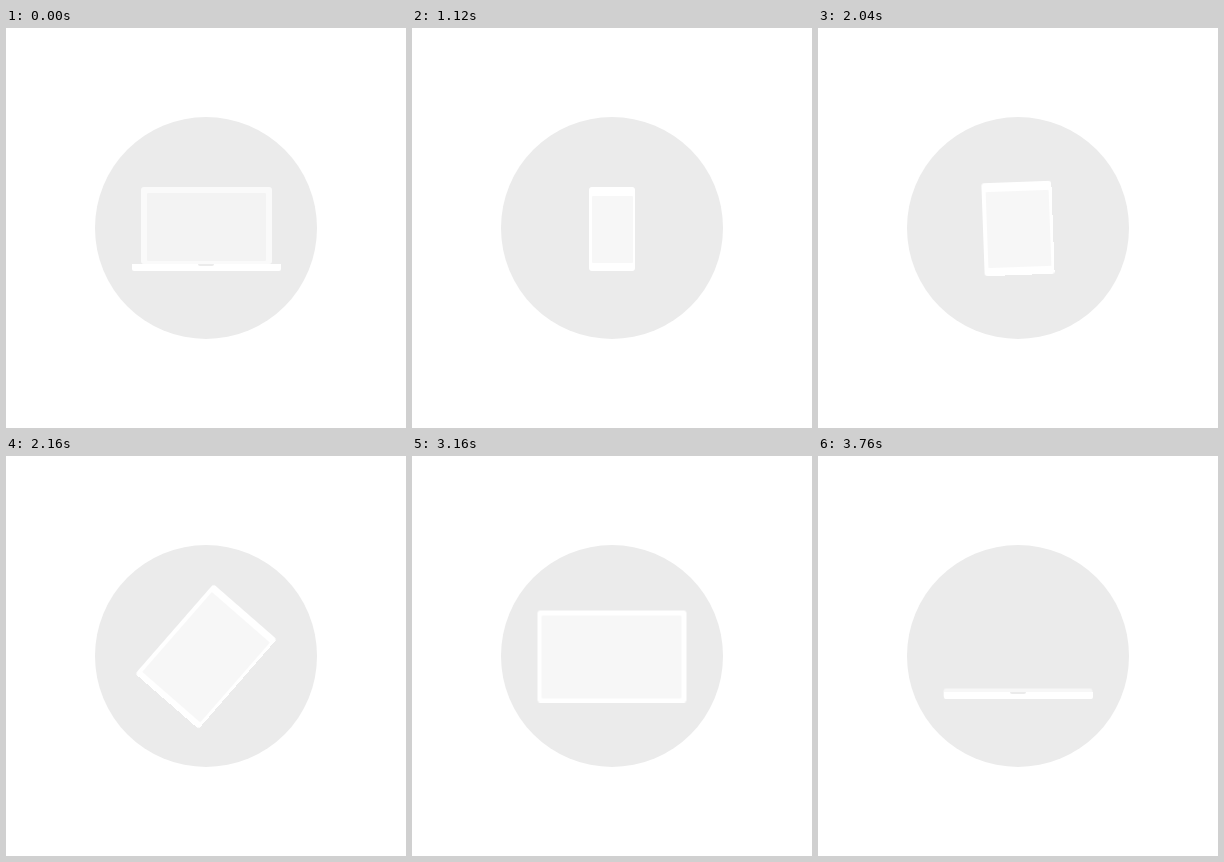
Write an HTML page that moves like this. It is 400x400 px and loops after 4960 ms.

```html
<!DOCTYPE html>
<html lang="en">
<head>
<meta charset="utf-8">
<title>Devices</title>
<style>
html, body {
  margin: 0;
  width: 100%;
  height: 100%;
  overflow: hidden;
  background: #fff;
}

.stage {
  position: relative;
  width: 400px;
  height: 400px;
  overflow: hidden;
}

.stage div {
  position: absolute;
  animation: 4960ms linear infinite;
}

.stage .disc {
  inset: 89px;
  border-radius: 50%;
  background: #ebebeb;
}

.stage .device {
  inset: 0;
  transform-origin: 200px 200.5px;
  animation-name: turn;
}

/* Edge offsets: 0 laptop, 1 phone, 2 tablet, 3 closed */
.stage .frame {
  --l0: 135px; --l1: 177px; --l2: 154px; --l3: 231.5px;
  --r0: 134.5px; --r1: 177px; --r2: 154px; --r3: 158.5px;
  --t0: 158.5px; --t1: 158.5px; --t2: 126px;
  --b0: 164px; --b1: 157.5px; --b2: 125px;
  --c0: #fafafa; --c1: #fff; --c3: #f7f7f7;
  --grow: cubic-bezier(.33, 0, .18, 1);
  border-radius: 3px;
  animation-name: left, right, ends, tint;
}

.stage .screen {
  --l0: 140.5px; --l1: 180px; --l2: 158.5px; --l3: 238px;
  --r0: 140px; --r1: 179.5px; --r2: 158px; --r3: 160.5px;
  --t0: 164.5px; --t1: 167.5px; --t2: 130.5px;
  --b0: 167.5px; --b1: 165.5px; --b2: 129.5px;
  --c0: #f3f3f3; --c1: #f7f7f7; --c3: #f7f7f7;
  --grow: cubic-bezier(.4, 0, .35, 1);
  border-radius: 1px;
  animation-name: left, right, ends, tint;
}

.stage .base {
  --l0: 125.5px; --l1: 177px; --l2: 125.5px; --l3: 125.5px;
  --r0: 125.5px; --r1: 177px; --r2: 125.5px; --r3: 125.5px;
  --grow: linear;
  top: 236px;
  height: 6.5px;
  border-radius: 0 0 2px 2px;
  background: #fff;
  animation-name: left, right, base;
}

.stage .notch {
  left: calc(50% - 8px);
  top: 0;
  width: 16px;
  height: 2px;
  border-radius: 0 0 2px 2px;
  background: #ebebeb;
  animation-name: notch;
}

/* The right edge pulls in first, the left edge follows */
@keyframes right {
  0%, 2.82% { right: var(--r0); animation-timing-function: ease-in-out; }
  6.45% { right: calc(var(--r0) - 3px); animation-timing-function: cubic-bezier(.45, 0, .55, 1); }
  16.13%, 37.9% { right: var(--r1); animation-timing-function: var(--grow); }
  48.39%, 63.31% { right: var(--r2); animation-timing-function: cubic-bezier(.4, 0, .4, 1); }
  74.19%, 100% { right: var(--r3); }
}

@keyframes left {
  0%, 11.29% { left: var(--l0); animation-timing-function: ease-in-out; }
  15.32% { left: calc(var(--l0) - 8px); animation-timing-function: cubic-bezier(.45, 0, .4, 1); }
  22.58%, 37.9% { left: var(--l1); animation-timing-function: var(--grow); }
  48.39%, 63.31% { left: var(--l2); animation-timing-function: cubic-bezier(.4, 0, .4, 1); }
  74.19%, 100% { left: var(--l3); }
}

@keyframes ends {
  0%, 9.68% { top: var(--t0); bottom: var(--b0); animation-timing-function: ease-in-out; }
  22.58%, 37.9% { top: var(--t1); bottom: var(--b1); animation-timing-function: cubic-bezier(.62, 0, .45, 1); }
  48.39%, 100% { top: var(--t2); bottom: var(--b2); }
}

@keyframes tint {
  0%, 2.82% { background: var(--c0); }
  22.58%, 71.77% { background: var(--c1); }
  74.19%, 100% { background: var(--c3); }
}

@keyframes turn {
  0%, 33.47% { transform: rotate(0deg); animation-timing-function: ease-in-out; }
  37.9% { transform: rotate(-15deg); animation-timing-function: cubic-bezier(.62, 0, .45, 1); }
  48.39%, 100% { transform: rotate(90deg); }
}

@keyframes base {
  0%, 22.58% { opacity: 1; }
  22.6%, 70.16% { opacity: 0; }
  74.19%, 100% { opacity: 1; }
}

@keyframes notch {
  0%, 2.82% { opacity: 1; }
  8%, 71.77% { opacity: 0; }
  74.19%, 100% { opacity: 1; }
}
</style>
</head>
<body>
<div class="stage">
  <div class="disc"></div>
  <div class="device">
    <div class="frame"></div>
    <div class="screen"></div>
  </div>
  <div class="base"><div class="notch"></div></div>
</div>
</body>
</html>
```
